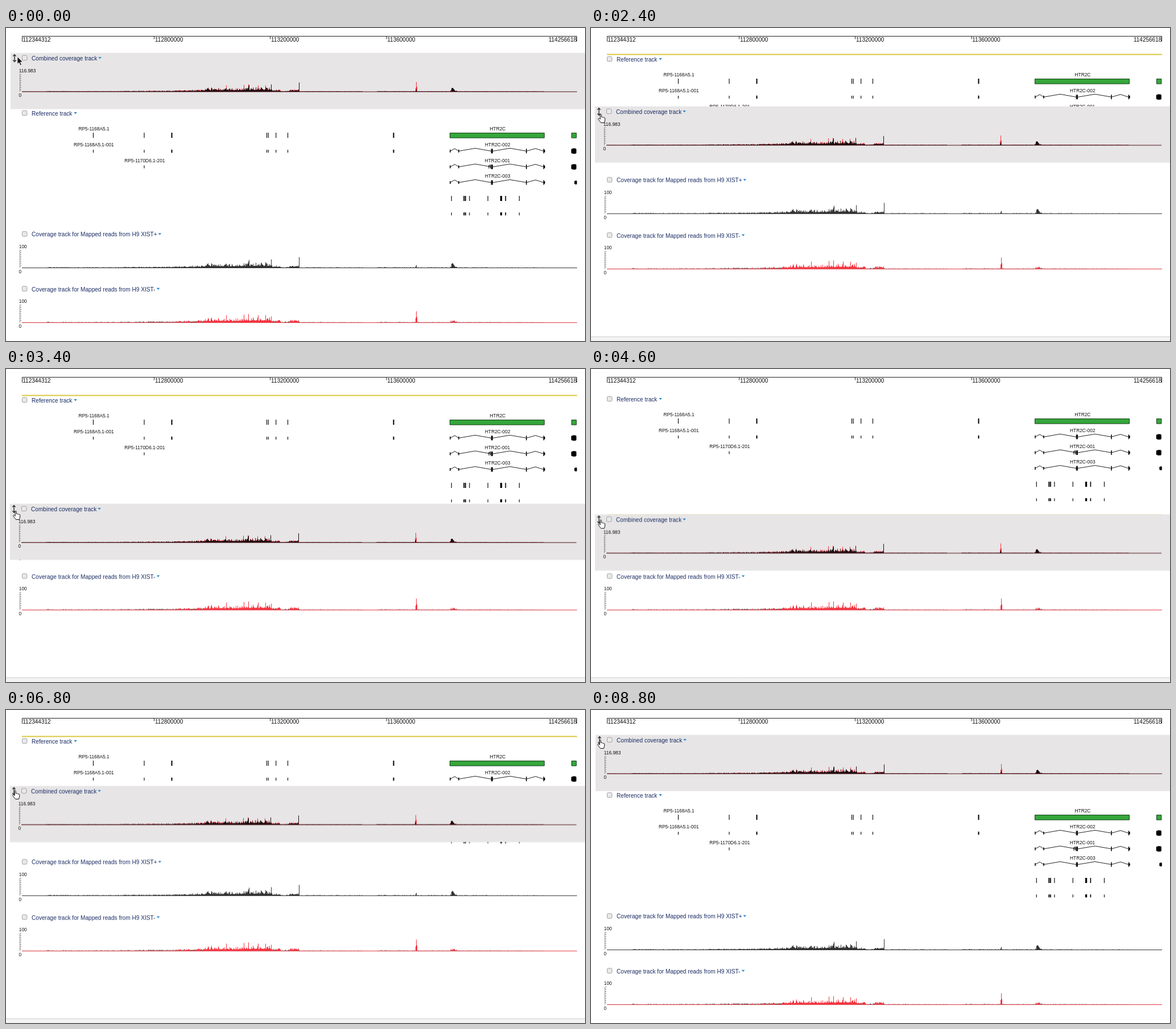
Animation of 1018x550 px, one loop 9 s. Source, as an HTML page:

```html
<!DOCTYPE html>
<html lang="en">
<head>
<meta charset="utf-8">
<title>Genome track reordering</title>
<style>
html, body { margin: 0; width: 100%; height: 100%; overflow: hidden; background: #fff; }
svg { display: block; width: 1018px; height: 550px; }
text { font-family: "Liberation Sans", Arial, sans-serif; }
.title { font-size: 10.12px; fill: #1b2d63; }
.tiny { font-size: 8.35px; fill: #111; }
.ruler { font-size: 10px; fill: #111; }
.mid { text-anchor: middle; }
.end { text-anchor: end; }

#ref, #plus, #minus, #drop, #foot, #comb, #hand, #arrow { animation: 9s step-end infinite; }
#ref { animation-name: ref; }
#plus { animation-name: plus; }
#minus { animation-name: minus; }
#drop { animation-name: drop; }
#foot { animation-name: foot; }
#comb { animation-name: drag; }
#hand { animation-name: hand; }
#arrow { animation-name: arrow; }

@keyframes ref {
  0%, 88.88% { transform: translateY(150px); }
  8.88%, 71.11% { transform: translateY(55px); }
  42.22% { transform: translateY(53px); }
  100% { transform: translateY(150px); }
}
@keyframes plus {
  0%, 88.88%, 100% { transform: translateY(362.5px); }
  8.88% { transform: translateY(267.3px); }
}
@keyframes minus {
  0%, 88.88%, 100% { transform: translateY(458.7px); }
  8.88% { transform: translateY(364.4px); }
}
@keyframes drop {
  0%, 88.88%, 100% { opacity: 0; transform: none; }
  8.88%, 71.11% { opacity: 1; transform: none; }
  42.22% { opacity: 1; transform: translateY(210px); }
}
@keyframes foot {
  0%, 88.88%, 100% { opacity: 0; }
  8.88% { opacity: 1; }
}
@keyframes drag {
  0% { transform: translate(0, 53px); }
  8.88% { transform: translate(-1px, 53px); animation-timing-function: steps(2); }
  13.33% { transform: translate(-1px, 61px); animation-timing-function: steps(2); }
  17.77% { transform: translate(-1px, 79px); animation-timing-function: steps(4); }
  26.66% { transform: translate(-1px, 147px); animation-timing-function: steps(5); }
  37.77% { transform: translate(-1px, 246px); animation-timing-function: steps(2); }
  42.22% { transform: translate(-1px, 260px); animation-timing-function: steps(3); }
  48.88% { transform: translate(-1px, 265px); animation-timing-function: steps(8); }
  66.66% { transform: translate(-1px, 262px); animation-timing-function: steps(4); }
  75.55% { transform: translate(-1px, 142.6px); animation-timing-function: steps(3); }
  82.22% { transform: translate(-1px, 53px); }
  88.88%, 100% { transform: translate(0, 53px); }
}
@keyframes hand {
  0% { opacity: 0; transform: translate(12px, 54px); }
  4.44% { opacity: 1; transform: translate(12px, 54px); animation-timing-function: steps(2); }
  8.88% { opacity: 1; transform: translate(12px, 56px); animation-timing-function: steps(2); }
  13.33% { opacity: 1; transform: translate(12px, 64px); animation-timing-function: steps(2); }
  17.77% { opacity: 1; transform: translate(12px, 82px); animation-timing-function: steps(4); }
  26.66% { opacity: 1; transform: translate(12px, 151px); animation-timing-function: steps(5); }
  37.77% { opacity: 1; transform: translate(12px, 249px); animation-timing-function: steps(2); }
  42.22% { opacity: 1; transform: translate(12px, 262px); animation-timing-function: steps(3); }
  48.88% { opacity: 1; transform: translate(12px, 265px); animation-timing-function: steps(8); }
  66.66% { opacity: 1; transform: translate(12px, 261px); animation-timing-function: steps(4); }
  75.55% { opacity: 1; transform: translate(11px, 141px); animation-timing-function: steps(3); }
  82.22%, 100% { opacity: 1; transform: translate(11px, 52px); }
}
@keyframes arrow {
  0% { opacity: 1; }
  4.44%, 100% { opacity: 0; }
}
</style>
</head>
<body>
<svg viewBox="0 0 1018 550">
  <g id="ruler">
    <path d="M28.5 24V14.5H1003.5V24M260.5 14.5v5M464.5 14.5v5M669 14.5v5" fill="none" stroke="#222"/>
    <text class="ruler" x="29.3" y="24.3">112344312</text>
    <text class="ruler" x="262" y="24.3">112800000</text>
    <text class="ruler" x="466" y="24.3">113200000</text>
    <text class="ruler" x="670.3" y="24.3">113600000</text>
    <text class="ruler end" x="1003.3" y="24.3">114256618</text>
  </g>
  <g id="foot"><path d="M0 542h1018v8H0z" fill="#f3f3f3"/><path d="M0 542.5h1018" stroke="#cfcfcf"/></g>
  <g id="ref"></g>
  <g id="plus"></g>
  <g id="minus"></g>
  <path id="drop" d="M28 46.5H1004" stroke="#dcc840" stroke-width="2"/>
  <g id="comb"></g>
  <path id="arrow" d="M20 50.5v13l3-2.8 2.2 5 2.2-1-2.1-4.8h4.2z" fill="#111" stroke="#fff" stroke-width=".8"/>
  <path id="hand" d="M4.2 9V1.6Q4.2.5 5.2.5T6.3 1.6V5.6Q7.5 4.8 8.4 6 9.6 5.3 10.5 6.6 12.6 6.2 12.7 8.2V11L11.4 15.5H5.5L1 9.7Q.2 8.2 1.4 7.7 2.8 7.6 4.2 9.4Z" fill="#fff" stroke="#111"/>
</svg>
<script>
const $ = id => document.getElementById(id);
const path = (d, color, width = 1, fill = 'none') =>
  `<path d="${d}" stroke="${color}" stroke-width="${width}" fill="${fill}"/>`;
const text = (s, x, y, cls) => `<text class="${cls}" x="${x}" y="${y}">${s}</text>`;
const ticks = (xs, y, h) => xs.map(x => `M${x} ${y}v${h}`).join('');

// Heading row; y = 0 is the middle of its title
const header = (name, caret) =>
  '<rect x="28.5" y="-4.8" width="8.4" height="8.4" rx="1.6" fill="#e9e9e9" stroke="#a0a0a0"/>' +
  text(name, 45, 3.9, 'title') +
  `<path d="M${caret} -2h5.6l-2.8 3.2z" fill="#2288cc"/>`;

// Shared envelope as x, height pairs
const shape = [28, .4, 69, .4, 72, 1, 190, 1, 205, 1.3, 290, 1.9, 320, 2.6, 345, 3.4, 353, 5,
  400, 5, 440, 6.4, 466, 6, 468, 3, 481, 3.2, 484, 1, 495, 1.4, 500, 3.4, 514, 3.8, 516, .9,
  626, .8, 627, 0, 651, 0, 652, 1.1, 780, .8, 781, 2.6, 791, 2.4, 793, .9, 945, .6, 947, 0, 1004, 0];
const blackPeaks = { 355: 8, 361: 8, 373: 6, 387: 7, 418: 8, 426: 11, 427: 14, 439: 9, 448: 9,
  456: 10, 466: 15, 515: 19, 720: 3, 721: 5, 783: 7, 784: 8, 785: 8, 786: 7, 787: 5, 788: 4 };
const redPeaks = { 355: 8, 361: 9, 373: 8, 387: 13, 404: 7, 418: 14, 426: 15, 434: 9, 443: 13,
  456: 13, 463: 9, 466: 11, 720: 8, 721: 20, 722: 10, 785: 4, 788: 4 };

function envelope(x) {
  let i = 0;
  while (shape[i + 2] < x) i += 2;
  const [x0, h0, x1, h1] = shape.slice(i, i + 4);
  return h0 + (h1 - h0) * (x - x0) / (x1 - x0);
}

function signal(peaks, seed) {
  const bars = [];
  for (let x = 28; x < 1004; x++) {
    seed = (seed * 16807) % 2147483647;
    const r = seed / 2147483647;
    bars.push([x, peaks[x] || envelope(x) * (.55 + .85 * r * r)]);
  }
  return bars;
}

const BASE = 59;
const bars = (list, color, scale, keep = () => true) => path(
  list.filter(([, h]) => h > .1 && keep(h))
    .map(([x, h]) => `M${x + .5} ${BASE}v${(-h * scale).toFixed(2)}`).join(''), color);

const black = signal(blackPeaks, 4711), red = signal(redPeaks, 9203);
const INK = '#333', RED = '#f5333f';
const baseline = color => path(`M28 ${BASE}H1004`, color);

function axis(max) {
  let d = 'M24.5 28V59';
  for (let y = 28; y <= 59; y += 3.9) d += `M24.5 ${y.toFixed(1)}h2.6`;
  return path(d, '#777', .8) + text(max, 22.8, 24.7, 'tiny') + text('0', 22.6, 68, 'tiny');
}

$('plus').innerHTML = header('Coverage track for Mapped reads from H9 XIST+', 267.5) + axis('100') +
  bars(black, INK, 1) + baseline(INK);

$('minus').innerHTML = header('Coverage track for Mapped reads from H9 XIST-', 264.8) + axis('100') +
  bars(red, '#554545', 1, h => h < 2.2) + bars(red, RED, 1, h => h >= 2.2) + baseline('#e0303c');

const SCALE = 100 / 116.983;
$('comb').innerHTML = '<path d="M8-9.2H1019V89.4H8z" fill="#e7e5e6"/>' +
  path('M15-6V6M12.3-3.4 15-6.4 17.7-3.4M12.3 3.4 15 6.4 17.7 3.4', '#222', 1.3) +
  header('Combined coverage track', 162.3) + axis('116.983') +
  bars(red, RED, SCALE) + bars(black, '#1c0d10', SCALE) + baseline('#4a1016');

// Gene models
const GREEN = '#35a63b';
const thin = [153.5, 243, 458.5, 461.2, 474.7, 495.5], thick = [291.5, 681.5];
const small = [783.3, 804.5, 808.3, 814.9, 847.3, 902.5], bold = [806.6, 869.8, 871.4, 878.4];

const transcript = y =>
  path(`M781 ${y}l8-4.5 7 4.5 29-5 28 5h3l30-5 29 5 16-4.5 14 4.5h2`, '#222') +
  path(ticks([781, 796], y - 2.5, 5) + ticks([853.5, 855.3, 915, 945.5], y - 4, 8) +
    ticks([947], y - 2, 4), '#000', 1.5);
const blob = (x, y, w, h) =>
  path(`M${x} ${y - h / 2 + 1}h2v-1h${w - 3}v1h1v${h - 2}h-1v1h-${w - 3}v-1h-2z`, '#000', .5, '#000');

$('ref').innerHTML = header('Reference track', 119.3) +
  path(ticks(thin, 34, 9) + ticks(thin, 64, 5) + ticks([243], 91.5, 5), '#111', 1.2) +
  path(ticks(thick, 34, 9) + ticks(thick, 63.8, 5.4), '#000', 2) +
  path('M780.5 34.5h166v8.6h-166zM994.5 34.5h8.4v8.6h-8.4z', '#153f18', 1, GREEN) +
  transcript(66.3) + transcript(94) + path('M848.5 94v-2l3-1.5v6M849 92v5', '#000') + transcript(121.5) +
  blob(994, 66.3, 8.6, 9) + blob(994, 94, 8.6, 9) + blob(999.6, 121.5, 4, 7) +
  path(ticks(small, 145, 9) + ticks(small, 174.3, 5), '#111', 1.2) +
  path(ticks(bold, 145, 9) + ticks(bold, 174, 5.3), '#000', 1.6) +
  [['RP5-1168A5.1', 154.5, 30.4], ['RP5-1168A5.1-001', 154.3, 58], ['RP5-1170D6.1-201', 243.8, 85.8],
   ['HTR2C', 864.5, 30.4], ['HTR2C-002', 864.3, 58], ['HTR2C-001', 864, 85.8], ['HTR2C-003', 864.3, 113.3]]
    .map(([s, x, y]) => text(s, x, y, 'tiny mid')).join('');
</script>
</body>
</html>
```
